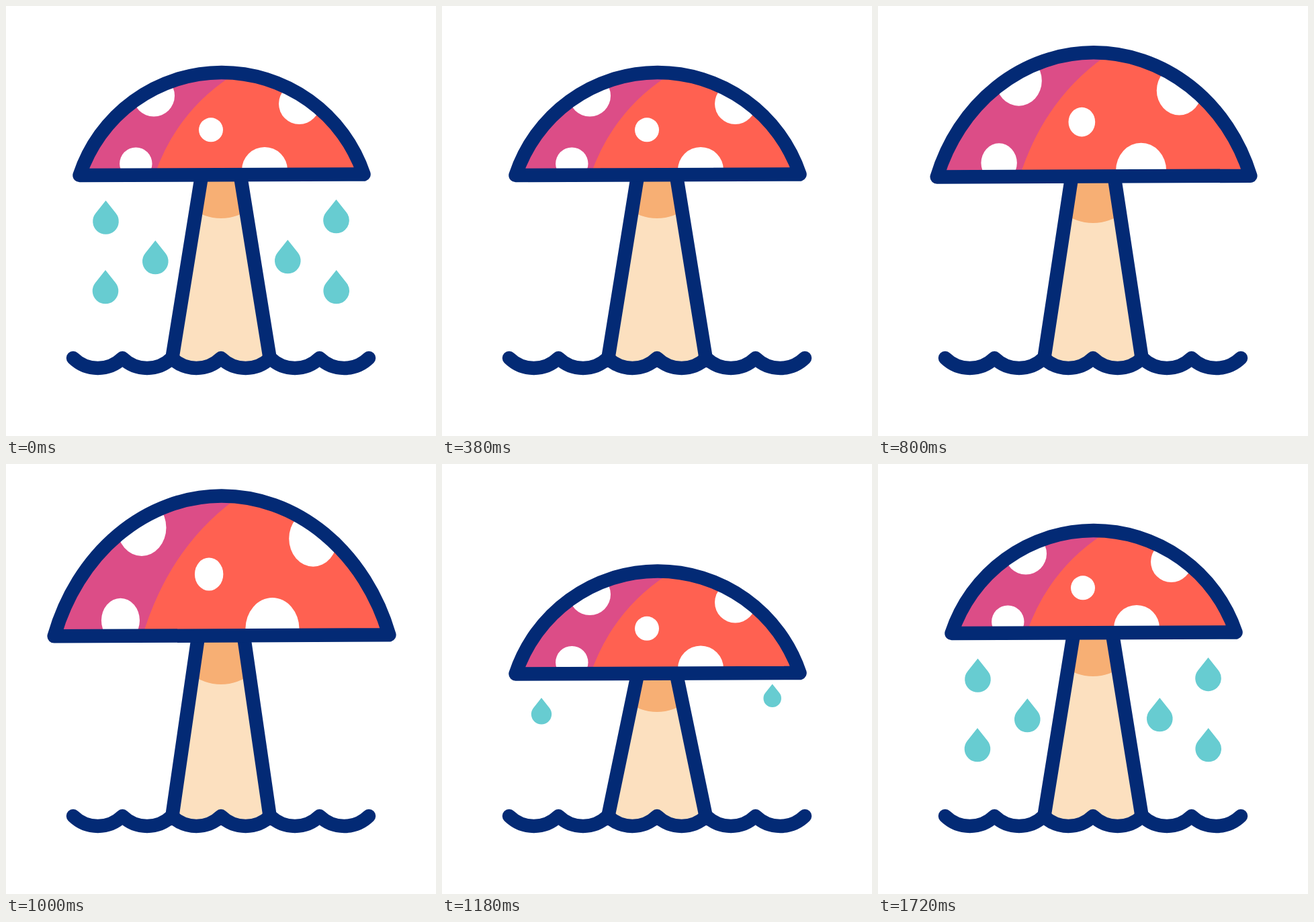
An HTML page for the animation above (2400 ms loop, 640 by 640 pixels).

```html
<!DOCTYPE html>
<html lang="en">
<head>
<meta charset="utf-8">
<title>Mushroom rain</title>
<style>
  html, body { margin: 0; width: 100%; height: 100%; overflow: hidden; background: #fff; }
  svg { display: block; width: 100%; height: 100%; }
  .line { fill: none; stroke: #032a75; stroke-width: 20.5; stroke-linecap: round; stroke-linejoin: round; }
</style>
</head>
<body>
<svg viewBox="0 0 640 640">
  <defs>
    <path id="dome" d="M109.5 252A223 223 0 0 1 532.5 250.5Z"/>
    <clipPath id="domeClip"><use href="#dome"/></clipPath>
    <clipPath id="stemClip"><path id="stemShape"/></clipPath>
  </defs>
  <g id="drops" fill="#67ccd1"></g>
  <g clip-path="url(#stemClip)">
    <rect width="640" height="640" fill="#fce0bf"/>
    <path id="shade" d="M270 100H370V298Q320 334 270 298Z" fill="#f7af74"/>
  </g>
  <path id="stemLines" class="line"/>
  <g id="cap">
    <g clip-path="url(#domeClip)">
      <rect x="90" y="80" width="460" height="190" fill="#ff6151"/>
      <path d="M336 104Q254 157 221 252H90V80H336Z" fill="#dc4d87"/>
      <g fill="#fff">
        <circle cx="220" cy="133.5" r="31"/>
        <circle cx="193.3" cy="234.7" r="24.2"/>
        <circle cx="305" cy="184.3" r="18"/>
        <circle cx="385" cy="244" r="34"/>
        <circle cx="436.5" cy="145.5" r="30.5"/>
      </g>
    </g>
    <use href="#dome" class="line" vector-effect="non-scaling-stroke"/>
  </g>
  <path id="waves" class="line"/>
</svg>
<script>
const LOOP = 2400;
const get = id => document.getElementById(id);
const [cap, shade, stemShape, stemLines, drops] =
  ['cap', 'shade', 'stemShape', 'stemLines', 'drops'].map(get);

const span = (t, a, b) => Math.min(1, Math.max(0, (t - a) / (b - a)));
const easeOut = (u, n) => 1 - (1 - u) ** n;
const smooth = u => u * u * (3 - 2 * u);

const arc = 'a52.4 52.4 0 0 0 73.33 0';
get('waves').setAttribute('d', 'M100 524' + arc.repeat(6));
get('dome').setAttribute('vector-effect', 'non-scaling-stroke');

// Resting tip and travel from under the cap, in order of release
const rain = [
  [148, 393, 210], [491.7, 393, 210],
  [222.3, 349, 150], [419.3, 348, 150],
  [148.5, 289.5, 54], [491.5, 288, 54]
].map(([x, y, travel]) => {
  const node = document.createElementNS('http://www.w3.org/2000/svg', 'path');
  node.setAttribute('d', 'M0 0L15.1 19A19.3 19.3 0 1 1 -15.1 19Z');
  drops.append(node);
  return { x, y, travel, node };
});

function drawDrop({ x, y, travel, node }, i, t) {
  let size, tip;
  if (t < 400) {
    const fall = span(t, 4 + i * 23, 264 + i * 23) ** 2;
    size = 1 - fall;
    tip = y + (530 - y) * fall;
  } else {
    size = easeOut(span(t, 940 + i * 48, 1540 + i * 48), 3);
    tip = y - travel * (1 - size);
  }
  node.setAttribute('visibility', size > 0.005 ? 'visible' : 'hidden');
  node.setAttribute('transform', `translate(${x} ${tip}) scale(${size})`);
}

function draw(t) {
  const slam = easeOut(span(t, 1030, 1150), 2);
  const swell = span(t, 530, 1030) * (1 - slam);
  const drop = 60.5 * slam * (1 - smooth(span(t, 1180, 1380)));
  const sx = 1 + 0.19 * swell;
  const sy = 1 + 0.387 * swell;
  cap.setAttribute('transform',
    `translate(321 ${240 + drop}) scale(${sx} ${sy}) translate(-321 -240)`);

  const top = 240 + 11 * sy + drop;
  const half = 28.6 * sx;
  const left = `${320 - half} ${top}`;
  const right = `${320 + half} ${top}`;
  stemLines.setAttribute('d', `M${left}L247.5 523M${right}L392.5 523`);
  stemShape.setAttribute('d', `M${right}L${left}L246.67 524${arc}${arc}Z`);
  shade.setAttribute('transform', `translate(0 ${12.8 * swell + 0.876 * drop})`);

  rain.forEach((d, i) => drawDrop(d, i, t));
}

const start = performance.now();
function tick() {
  draw((performance.now() - start) % LOOP);
  requestAnimationFrame(tick);
}
tick();
</script>
</body>
</html>
```
